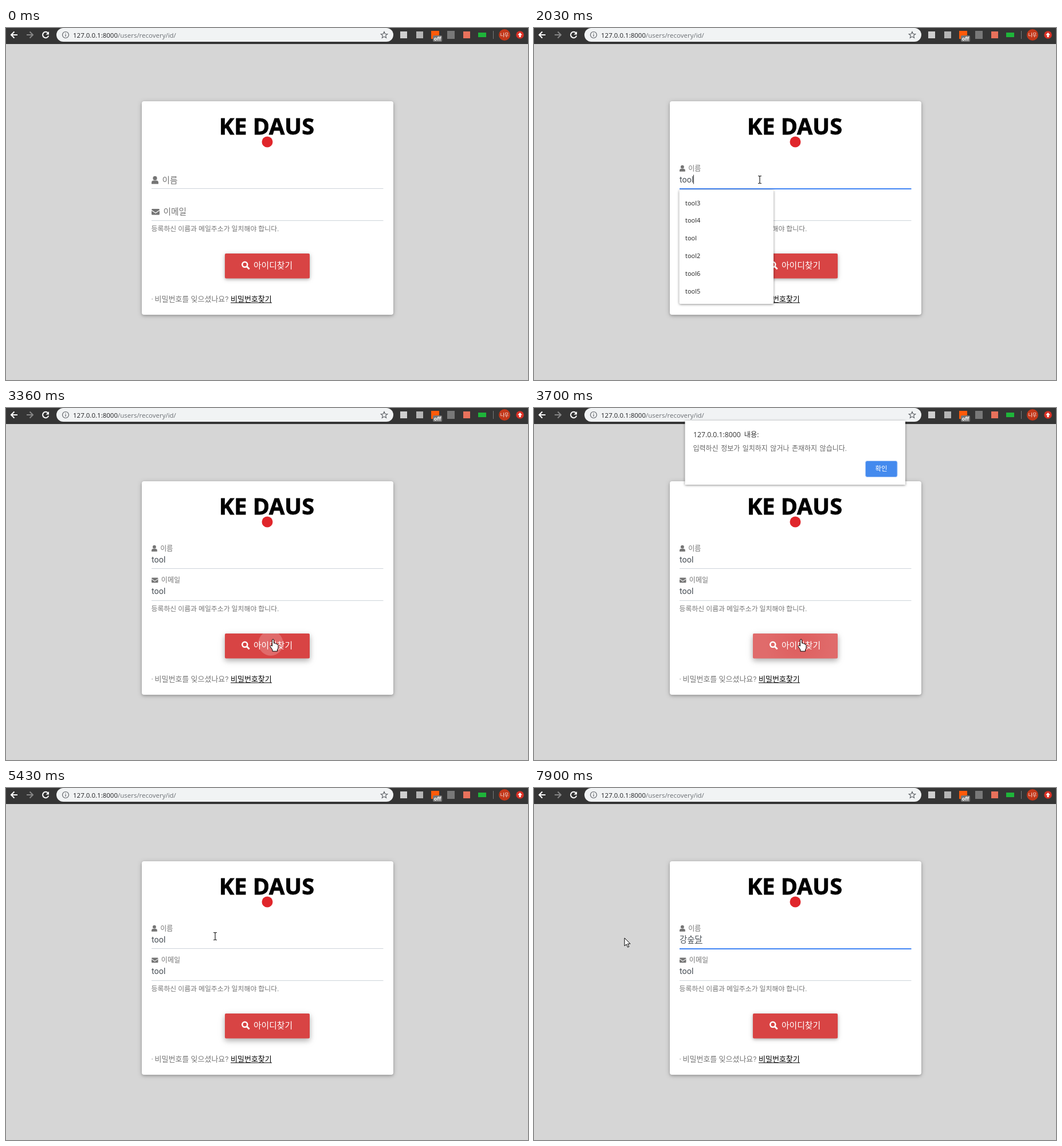
Recreate the animation shown at these times as an HTML page. Size 911 by 615 pixels, loop 8000 ms.

```html
<!DOCTYPE html>
<html lang="ko">
<head>
<meta charset="utf-8">
<style>
  html, body { margin: 0; height: 100%; overflow: hidden; background: #d6d6d6; }
  svg { display: block; width: 911px; height: 615px; }
  text { font-family: Roboto, "Noto Sans CJK KR", "Noto Sans CJK", sans-serif; white-space: pre; }
  .ui { font-family: "Open Sans", "Noto Sans CJK KR", "Noto Sans CJK", sans-serif; }
  .logo { font: 900 39.5px "Noto Sans", sans-serif; stroke: #000; stroke-width: .8px; }
  .grey { fill: #757575; }
  .line { fill: none; stroke: #fff; stroke-width: 2; }
  .entry { font-size: 14.4px; fill: #495057; }
  .panel { fill: #fff; filter: drop-shadow(0 1px 2px rgba(0,0,0,.45)); }
  .low { filter: drop-shadow(0 2px 2.5px rgba(0,0,0,.2)) drop-shadow(0 1px 4px rgba(0,0,0,.16)); }
  .high { filter: drop-shadow(0 4px 5px rgba(0,0,0,.2)) drop-shadow(0 3px 6px rgba(0,0,0,.15)); }
  .cursor { fill: #fff; stroke: #000; stroke-width: 1; }
</style>
</head>
<body>
<svg viewBox="0 0 911 615">
  <defs>
    <clipPath id="buttonClip"><rect x="382" y="394" width="148" height="43.5" rx="2"/></clipPath>
    <radialGradient id="wave">
      <stop offset="0" stop-color="#fff" stop-opacity=".14"/>
      <stop offset=".4" stop-color="#fff" stop-opacity=".21"/>
      <stop offset="1" stop-color="#fff" stop-opacity=".21"/>
    </radialGradient>
  </defs>

  <rect width="911" height="615" fill="#d6d6d6"/>

  <g id="toolbar">
    <rect width="911" height="28" fill="#353535"/>
    <rect x="88" y="0" width="588" height="24" rx="12" fill="#f1f3f4"/>
    <path class="line" d="M20 12H9M14.5 6.5L9 12l5.500 5.500"/>
    <path class="line" style="stroke:#858585" d="M36 12h11M41.500 6.500L47 12l-5.500 5.500"/>
    <path class="line" d="M73.500 9A5.200 5.200 0 1 0 74.200 13.500"/>
    <path fill="#fff" d="M75 6v5.500h-5.500z"/>
    <g fill="none" stroke="#5f6368" stroke-width="1.2">
      <circle cx="104" cy="12" r="5.500"/>
      <path d="M104 11v4M104 8.500v1.300"/>
      <path d="M660 6.500l1.600 3.800 4.100.300-3.100 2.700 1 4-3.600-2.200-3.600 2.200 1-4-3.100-2.700 4.100-.300z"/>
    </g>
    <text class="ui" x="117" y="16.500" font-size="11.500" fill="#202124">127.0.0.1:8000<tspan fill="#6b6f74">/users/recovery/id/</tspan></text>
    <rect x="688" y="6" width="12" height="12" fill="#cfcfcf"/>
    <rect x="716" y="6" width="12" height="12" fill="#b5b5b5"/>
    <rect x="742" y="5" width="14" height="14" fill="#ff5a0a"/>
    <rect x="745" y="13" width="16" height="11" rx="2" fill="#777"/>
    <text class="ui" x="753" y="21.500" font-size="9" font-weight="700" fill="#fff" text-anchor="middle">off</text>
    <rect x="770" y="5" width="13" height="14" fill="#787878"/>
    <rect x="798" y="6" width="12" height="12" fill="#e8725c"/>
    <rect x="824" y="8" width="14" height="8" fill="#1fb53a"/>
    <rect x="850" y="5" width="1" height="14" fill="#777"/>
    <circle cx="870" cy="12" r="10" fill="#c3381a"/>
    <text x="870" y="15" font-size="8" fill="#fff" text-anchor="middle">나무</text>
    <circle cx="897" cy="12" r="6.800" fill="#d93025"/>
    <path fill="#fff" d="M897 8l4 4.200h-2.500V16h-3v-3.800H893z"/>
  </g>

  <rect class="low" x="237" y="128" width="439" height="373" rx="4" fill="#fff"/>
  <text class="logo" x="372" y="186">KE</text>
  <text class="logo" x="538" y="186" text-anchor="end">DAUS</text>
  <circle cx="456" cy="199" r="9.500" fill="#e0262b"/>

  <g id="nameLabel" class="grey">
    <circle cx="6" cy="-3" r="3.600"/>
    <path d="M0 7V4.500Q0 1 3.500 1H8.500Q12 1 12 4.500V7z"/>
    <text x="18.500" y="5.400" font-size="14.700">이름</text>
  </g>
  <g id="mailLabel" class="grey">
    <rect y="-5" width="14" height="10.500" rx="1.500"/>
    <path d="M0-2.500L7 2.300 14-2.500" fill="none" stroke="#fff" stroke-width="1.300"/>
    <text x="20.500" y="5.400" font-size="14.700">이메일</text>
  </g>

  <rect id="selection" x="254" y="256" height="17" fill="#3390ff"/>
  <text id="nameText" class="entry" x="254" y="269.500"/>
  <text id="mailText" class="entry" x="254" y="325"/>
  <rect id="composing" y="271" height="1" fill="#495057"/>
  <rect id="caret" width="1" height="16" fill="#333"/>
  <rect id="nameLine" x="254" y="280" width="404.500"/>
  <rect id="mailLine" x="254" y="336" width="404.500"/>

  <text class="grey" x="253.500" y="355.300" font-size="11.900">등록하신 이름과 메일주소가 일치해야 합니다.</text>

  <rect id="button" x="382" y="394" width="148" height="43.500" rx="2" fill="#d84444"/>
  <circle id="ripple" cx="462" cy="411" fill="url(#wave)" clip-path="url(#buttonClip)"/>
  <circle cx="416.800" cy="413.300" r="4.500" class="line" style="stroke-width:2.600"/>
  <path class="line" style="stroke-width:3" d="M420 416.500l4.700 4.700"/>
  <text x="432" y="420.300" font-size="14.800" font-weight="500" fill="#fff">아이디찾기</text>

  <text class="grey" x="253.500" y="478" font-size="13">·</text>
  <text class="grey" x="259.500" y="478" font-size="13">비밀번호를 잊으셨나요?</text>
  <text x="392" y="478" font-size="13">비밀번호찾기</text>
  <rect x="392" y="479.500" width="72" height="1"/>

  <g id="nameList"></g>
  <g id="mailList"></g>

  <g id="dialog">
    <path id="sheet" class="panel"/>
    <text class="ui" x="278" y="50.500" font-size="12.200" fill="#333" style="word-spacing:3px">127.0.0.1:8000 내용:</text>
    <text x="277.500" y="74.700" font-size="12" fill="#666" style="word-spacing:1.500px">입력하신 정보가 일치하지 않거나 존재하지 않습니다.</text>
    <rect id="confirm" x="578.500" y="92.500" width="55.500" height="28" rx="3" stroke="#a9c8f8"/>
    <text x="606" y="110.300" font-size="11.500" fill="#fff" text-anchor="middle">확인</text>
  </g>

  <g id="arrow" class="cursor"><path d="M0 0V14l3.300-3 2.300 5.200 2.200-1-2.300-5H10z"/></g>
  <g id="beam"><path d="M-3-6.500H-1L0-5.500 1-6.500H3M-3 6.500H-1L0 5.500 1 6.500H3M0-5.500V5.500" fill="none" stroke="#222" stroke-width="1.200"/></g>
  <g id="hand" class="cursor"><path d="M-1.500 11V1Q-1.500-1 0-1T1.500 1V6Q4 5 4.500 7 6.500 6 7 8 9 7.500 9 9.500V14Q8.500 16 7.500 17V20H-1V17.500L-5 11.500Q-4.500 8.500-1.500 11z"/></g>
</svg>
<script>
const LOOP = 8000, WORD = 'tool', GIVEN = '강숲달';
const $ = id => document.getElementById(id);
const set = (id, attrs) => { for (const k in attrs) $(id).setAttribute(k, attrs[k]); };
const show = (id, on) => { $(id).style.display = on ? '' : 'none'; };
const between = (t, a, b) => t >= a && t < b;
const progress = (t, a, b) => Math.min(1, Math.max(0, (t - a) / (b - a)));
const smooth = p => p * p * (3 - 2 * p);
const easeOut = p => 1 - (1 - p) ** 2;

const nameTyping = [[0, ''], [1630, 't'], [1710, 'to'], [1790, 'too'], [1900, WORD],
  [6630, 'ㄱ'], [6710, '가'], [6790, '강'], [6870, '강ㅅ'], [6960, '강수'],
  [7100, '강숲'], [7360, '강숲다'], [7430, GIVEN]];
const mailTyping = [[0, ''], [2630, 't'], [2690, 'to'], [2800, 'too'], [2880, WORD]];
const pointerPath = [[500, 925, 242], [900, 400, 258], [1700, 400, 258], [1900, 394, 265],
  [2050, 394, 265], [2430, 478, 326], [2950, 478, 326], [3250, 466, 405], [4230, 466, 405],
  [4600, 590, 107], [4850, 590, 107], [5100, 520, 185], [5430, 365, 259], [5520, 365, 259],
  [5900, 158, 262]];

const latest = (list, t) => list.filter(e => e[0] <= t).pop();

function pointerAt(t) {
  const a = latest(pointerPath, t) || pointerPath[0];
  const b = pointerPath[pointerPath.indexOf(a) + 1] || a;
  const p = a === b ? 0 : smooth(progress(t, a[0], b[0]));
  return [a[1] + (b[1] - a[1]) * p, a[2] + (b[2] - a[2]) * p];
}

function buildList(id, top, items) {
  $(id).innerHTML = `<rect class="panel" x="253.500" y="${top}" width="164.500" height="199" rx="2"/>` +
    items.map((s, i) => `<text class="ui" x="264" y="${top + 26.5 + i * 30.85}" font-size="11" fill="#222">${s}</text>`).join('');
}
buildList('nameList', 283, [3, 4, '', 2, 6, 5].map(n => WORD + n));
buildList('mailList', 338.5, [5, 6, 3, 4, 1, 2].map(n => `${WORD}${n}@mail.demo`));

function floatLabel(id, y, p) {
  set(id, { transform: `translate(254 ${y - 20.3 * p}) scale(${1 - .18 * p})` });
}

function drawLine(id, focused) {
  set(id, { height: focused ? 2 : 1, fill: focused ? '#4285f4' : '#ced4da' });
}

function drawFields(t) {
  const onName = between(t, 1100, 2440) || t >= 5520;
  const onMail = between(t, 2440, 3340);
  const selected = between(t, 5520, 6630);
  floatLabel('nameLabel', 265.4, easeOut(progress(t, 1100, 1300)));
  floatLabel('mailLabel', 321, easeOut(progress(t, 2440, 2600)));
  drawLine('nameLine', onName);
  drawLine('mailLine', onMail);

  const name = $('nameText'), mail = $('mailText');
  name.textContent = latest(nameTyping, t)[1];
  mail.textContent = latest(mailTyping, t)[1];
  const width = el => el.textContent ? el.getComputedTextLength() : 0;
  const nameWidth = width(name);

  const marked = progress(t, 5600, 5760);
  show('selection', selected);
  set('selection', { x: 254 + nameWidth * (1 - marked), width: nameWidth * marked });
  name.style.fill = selected && marked === 1 ? '#fff' : '';

  show('composing', t >= 6630);
  if (t >= 6630) {
    const last = name.getSubStringLength(name.textContent.length - 1, 1);
    set('composing', { x: 254 + nameWidth - last, width: last });
  }
  show('caret', (onName && !selected && t < 7900) || onMail);
  set('caret', { x: Math.round(254 + (onMail ? width(mail) : nameWidth)), y: onMail ? 312 : 256.5 });

  show('nameList', between(t, 1630, 2440) || between(t, 5560, 6630));
  show('mailList', between(t, 2630, 3320));
}

function drawButton(t) {
  set('button', { class: between(t, 3220, 5520) ? 'high' : 'low' });
  set('ripple', { r: 150 * easeOut(progress(t, 3340, 3620)), opacity: 1 - progress(t, 5060, 5380) });
}

function drawDialog(t) {
  const p = easeOut(progress(t, 3400, 3580)) * (1 - progress(t, 4720, 4890));
  const tilt = 4 * (1 - p);
  show('dialog', p > 0);
  set('dialog', { transform: `translate(0 ${-13 * (1 - p)})`, opacity: Math.min(1, p * 1.25) });
  set('sheet', { d: `M${263.5 + tilt / 4} 22H${648 - tilt / 4}L${648 + tilt / 6} 134H${263.5 - tilt / 6}z` });
  set('confirm', { fill: t > 4640 ? '#478ce9' : '#448aee' });
}

function drawPointer(t) {
  const [x, y] = pointerAt(t);
  const inside = (l, top, r, bottom) => x >= l && x <= r && y >= top && y <= bottom;
  const kind = inside(382, 394, 530, 438) ? 'hand'
    : inside(254, 240, 658, 281) || inside(254, 296, 658, 337) ? 'beam' : 'arrow';
  for (const id of ['arrow', 'beam', 'hand']) show(id, id === kind && t >= 500);
  set(kind, { transform: `translate(${x.toFixed(1)} ${y.toFixed(1)})` });
}

function frame(now) {
  const t = now % LOOP;
  drawFields(t);
  drawButton(t);
  drawDialog(t);
  drawPointer(t);
  requestAnimationFrame(frame);
}
frame(0);
</script>
</body>
</html>
```
